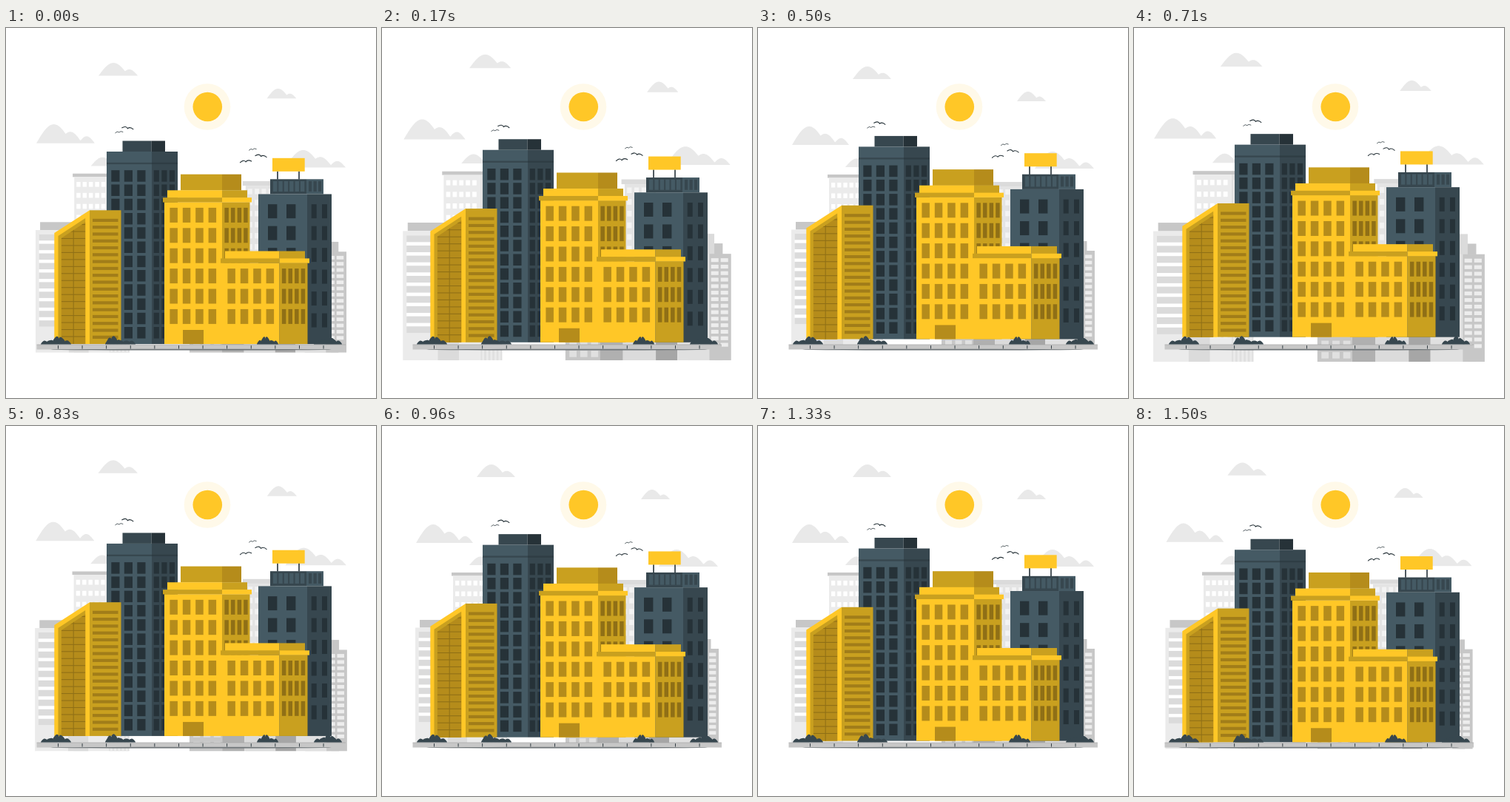
Animation, 500 px wide and 500 px high, one loop 1540 ms. Source, as an HTML page with a canvas:

```html
<!DOCTYPE html>
<html lang="en">
<head>
<meta charset="utf-8">
<title>City skyline</title>
<style>
html, body { margin: 0; width: 100%; height: 100%; overflow: hidden; background: #fff; }
canvas { display: block; width: 100vw; height: 100vh; }
</style>
</head>
<body>
<canvas id="stage" width="500" height="500"></canvas>
<script>
const ctx = document.getElementById('stage').getContext('2d');
const LOOP = 1540;
const CYCLE = 1500;
const GROUND = 428;
const STREET = 434;
const YELLOW = '#ffc727', GOLD = '#c9a01f', OCHRE = '#b58c1b', BROWN = '#8f6f16';
const SLATE = '#455a64', STEEL = '#37474f', NIGHT = '#263238';
const PALE = '#ebebeb', LIGHT = '#dbdbdb', GRAY = '#c7c7c7', DIM = '#a6a6a6';

// Rectangle given by its left, top, right and bottom edges.
function box(color, x1, y1, x2, y2) {
  ctx.fillStyle = color;
  ctx.fillRect(x1, y1, x2 - x1, y2 - y1);
}

// Two visible faces of a block meeting at x = mid.
function block(front, side, x1, mid, x2, y1, y2 = GROUND - .5) {
  box(front, x1, y1, mid, y2);
  box(side, mid, y1, x2, y2);
}

// Evenly spaced panes filling an area; gapX and gapY are the spaces between them.
function grid(color, x1, y1, x2, y2, cols, rows, gapX, gapY) {
  const w = (x2 - x1 + gapX) / cols, h = (y2 - y1 + gapY) / rows;
  for (let i = 0; i < cols * rows; i++) {
    const x = x1 + (i % cols) * w, y = y1 + Math.floor(i / cols) * h;
    box(color, x, y, x + w - gapX, y + h - gapY);
  }
}

function disc(color, x, y, r) {
  ctx.fillStyle = color;
  ctx.beginPath();
  ctx.arc(x, y, r, 0, Math.PI * 2);
  ctx.fill();
}

// Fills the area below height(u), with u running from 0 to 1 across the width.
function hill(color, x, base, w, height) {
  ctx.fillStyle = color;
  ctx.beginPath();
  ctx.moveTo(x, base);
  for (let u = 0; u <= 1; u += .01) ctx.lineTo(x + u * w, base - height(u));
  ctx.lineTo(x + w, base);
  ctx.fill();
}

// Each hump of a cloud is a scaled-down copy of the one to its left.
function cloud(x, base, w, h, humps) {
  const radius = humps === 2 ? .38 : .3;
  const shrink = humps === 2 ? .58 : .68;
  const last = 1 - radius * shrink ** (humps - 1);
  hill('#e9e9e9', x, base, w, u => {
    let top = 0;
    for (let i = 0; i < humps; i++) {
      const center = radius + (last - radius) * i / (humps - 1);
      const d = Math.min(1, Math.abs(u - center) / (radius * shrink ** i));
      top = Math.max(top, shrink ** (1.3 * i) * Math.cos(d * Math.PI / 2));
    }
    return h * top;
  });
}

// Lumpy outline that is tallest at the given share of the width.
function bush(x, w, peak) {
  hill(STEEL, x, GROUND - .5, w, u => {
    const lump = Math.sqrt(Math.abs(Math.sin(u * Math.PI * 5)));
    return (5 + 6.5 * Math.exp(-(((u - peak) / .17) ** 2))) * (.65 + .35 * lump)
      * Math.min(1, Math.sqrt(Math.min(u, 1 - u) * 9));
  });
}

function drawClouds() {
  cloud(128, 69, 52, 17, 2);
  cloud(46, 158, 77, 25, 3);
  cloud(118, 188, 40, 11.5, 2);
  cloud(350, 99, 39, 13, 2);
  cloud(374, 190, 80, 23, 3);
}

function drawFarCity() {
  box(GRAY, 94, 198, 170, 202.5);
  block(PALE, '#e0e0e0', 96, 142, 169, 202.5, STREET);
  grid('#fff', 99, 209, 137, 404, 5, 14, 2.9, 8);
  grid(PALE, 144, 209, 167, STREET, 5, 1, 2.5, 0);

  box(GRAY, 51, 262, 115, 272.5);
  block(PALE, LIGHT, 45, 88.5, 115, 272.5, STREET);
  box('#fff', 49.5, 278, 85, 400);
  grid(LIGHT, 49.5, 278, 85, 400, 1, 10, 0, 4.3);

  box(LIGHT, 318, 208, 360, 214);
  box('#e4e4e4', 322, 214, 361, STREET);
  grid('#f3f3f3', 325, 218, 358, 415, 4, 14, 3.3, 7.5);
  block(GRAY, '#b0b0b0', 248, 291, 320, 300, STREET);
  grid('#e0e0e0', 253, 310, 289, STREET - 4, 3, 9, 4.5, 6);
  block(LIGHT, DIM, 320, 361, 388, 300, STREET);

  box(LIGHT, 400, 276, 434, STREET);
  box(GRAY, 434, 288, 444.5, STREET);
  block('#e0e0e0', GRAY, 388, 428, 455, 301, STREET);
  grid('#ededed', 430, 306.5, 451.3, 417, 2, 14, 2.7, 3.4);
}

function drawTower() {
  block(STEEL, NIGHT, 157.5, 196.7, 215, 153, 167.5);
  block(SLATE, STEEL, 136, 197, 232, 167.5);
  block(STEEL, '#2f3d44', 136, 197, 232, 182.3, 184.6);
  grid(NIGHT, 142.3, 192.7, 188.5, 420, 3, 12, 6.3, 3.75);
  grid(NIGHT, 199.7, 192.7, 228.1, 420, 3, 12, 3.4, 3.75);
}

function drawOffice() {
  block(STEEL, SLATE, 357, 406, 429, 204.8, 225);
  grid(SLATE, 361, 207.5, 403.3, 221.5, 6, 1, 2.1, 0);
  grid(STEEL, 409, 207.5, 426.2, 221.5, 3, 1, 2.3, 0);
  grid(NIGHT, 366.2, 194, 396.8, 205, 2, 1, 27.4, 0);
  box(YELLOW, 360, 176.3, 403.7, 194.3);
  block(SLATE, STEEL, 341, 407, 440, 225);
  grid(NIGHT, 354, 238.7, 391.4, 405, 2, 6, 12.6, 10.5);
  grid(NIGHT, 412.7, 238.7, 434, 405, 2, 6, 7.3, 10.5);
}

// Yellow wing: roof slab, walls, cornice and windows, all hung from its top edge.
function drawWing(left, mid, right, top, floors) {
  const wall = top + 16, pane = top + 23.6, bottom = pane + floors * 27.4 - 7.4;
  block(YELLOW, GOLD, left + 4, mid, right - 3.5, top, top + 10.5);
  block(YELLOW, GOLD, left, mid, right, wall);
  block(GOLD, YELLOW, left - 2, mid, right + 2.5, top + 9.9, wall + .2);
  grid(OCHRE, left + 7.4, pane, left + 70.1, bottom, 4, floors, 6.9, 7.4);
  grid(BROWN, mid + 3.4, pane, mid + 34.7, bottom, 4, floors, 3.1, 7.4);
}

function drawHall() {
  block(GOLD, OCHRE, 236, 292, 318, 198.2, 220);
  drawWing(214, 292, 329.5, 219.8, 6);
  box(OCHRE, 239, 408.5, 267, GROUND - .5);
  drawWing(292, 369.5, 407.5, 302, 3);
}

// Wall whose roof line falls to the left.
function slopedWall(color, x1, y1, x2, y2) {
  ctx.fillStyle = color;
  ctx.beginPath();
  ctx.moveTo(x1, y1);
  ctx.lineTo(x2, y2);
  ctx.lineTo(x2, GROUND - .5);
  ctx.lineTo(x1, GROUND - .5);
  ctx.fill();
}

function drawGlassHouse() {
  slopedWall(YELLOW, 65.3, 277.5, 113, 246.8);
  slopedWall(GOLD, 70.5, 281.5, 107.2, 257.5);
  ctx.save();
  slopedWall(OCHRE, 74.8, 284.5, 107.2, 263);
  ctx.clip();
  box(BROWN, 90.7, 263, 91.7, GROUND);
  grid(BROWN, 74.8, 265.5, 107.2, 418, 1, 17, 0, 8.4);
  ctx.restore();
  box(GOLD, 113, 246.8, 155.5, GROUND - .5);
  grid('#a17d19', 117, 258.3, 151.5, 420.4, 1, 18, 0, 5.1);
}

function bird(x, y, size, tilt) {
  ctx.save();
  ctx.translate(x, y);
  ctx.rotate(tilt);
  ctx.scale(size, size);
  ctx.strokeStyle = NIGHT;
  ctx.lineWidth = 1.1;
  ctx.beginPath();
  ctx.moveTo(-8, 1.5);
  ctx.quadraticCurveTo(-3, -3, 0, .8);
  ctx.quadraticCurveTo(3, -2.6, 8, .8);
  ctx.stroke();
  ctx.restore();
}

function drawBirds() {
  bird(164.5, 135.5, 1, .18);
  bird(152.8, 141, .68, -.08);
  bird(324, 180.5, 1, -.08);
  bird(333.3, 164.3, .66, -.12);
  bird(344.7, 173.2, 1, .18);
}

function drawGround() {
  box(GRAY, 41.5, GROUND, 459, STREET + .5);
  box(DIM, 41.5, GROUND - .4, 459, GROUND + .3);
  grid(NIGHT, 70, GROUND + 1, 429.5, STREET - .5, 12, 1, 31.7, 0);
  ctx.fillStyle = '#6f7578';
  ctx.beginPath();
  ctx.ellipse(250, STREET + .7, 190, .9, 0, 0, Math.PI * 2);
  ctx.fill();
}

function drawBushes() {
  bush(47, 41, .58);
  bush(134, 41, .25);
  bush(339, 29, .4);
  bush(416, 38, .53);
}

// Linear rise to 1 at the peak and linear fall back to 0.
function beat(p, peak, rise, fall) {
  const d = p - peak;
  return Math.max(0, d < 0 ? 1 + d / rise : 1 - d / fall);
}

function draw(time) {
  const p = (Math.min(36 + .988 * (time % LOOP), CYCLE + 36) / CYCLE) % 1;
  const scale = 1 + .1 * Math.max(beat(p, .1, .1, .2), beat(p, .5, .1, .1));
  const lift = 10 * beat(p, .5, .5, .5);
  box('#fff', 0, 0, 500, 500);

  ctx.save();
  ctx.translate(250, 250);
  ctx.scale(scale, scale);
  ctx.translate(-250, -250);
  drawClouds();
  drawFarCity();
  ctx.restore();

  disc('#fff9e9', 272, 106.5, 31.3);
  disc(YELLOW, 272.3, 106.5, 19.8);

  drawGround();
  ctx.save();
  ctx.translate(0, -lift);
  drawTower();
  drawOffice();
  drawHall();
  drawGlassHouse();
  drawBirds();
  ctx.restore();
  drawBushes();
}

const start = performance.now();
function tick() {
  draw(performance.now() - start);
  requestAnimationFrame(tick);
}
tick();
</script>
</body>
</html>
```
